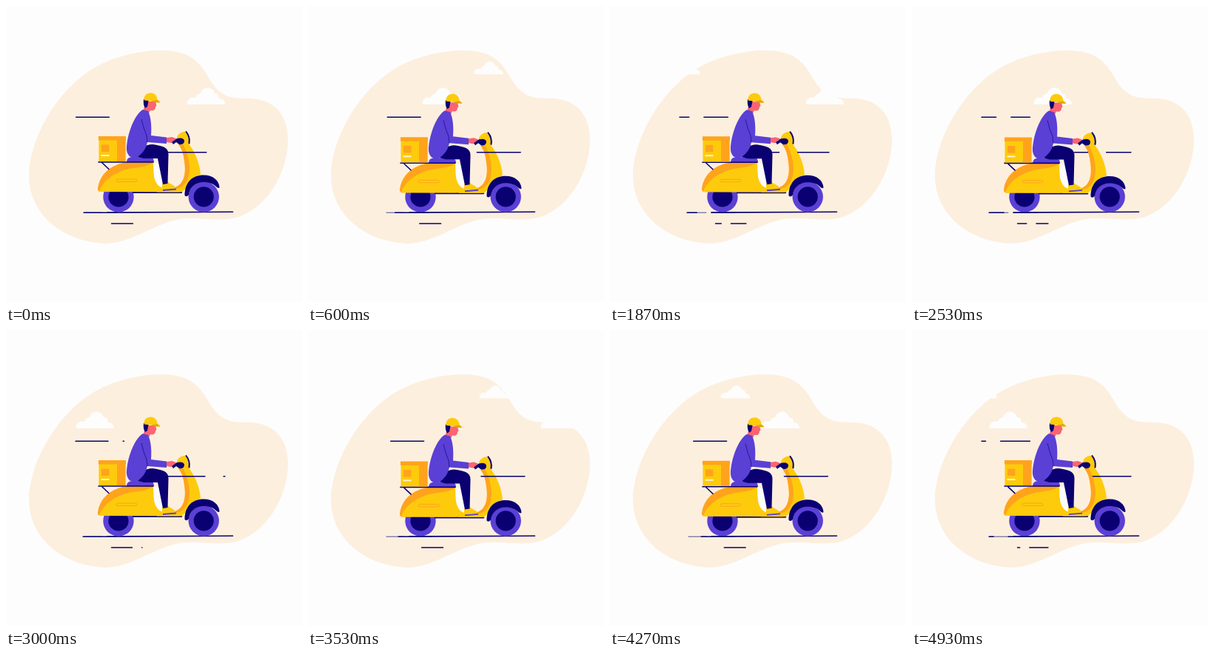
An HTML page that plays this animation: 400 by 400 pixels, repeating every 4.99 s.

```html
<!DOCTYPE html>
<html lang="en">
<head>
<meta charset="utf-8">
<title>Scooter delivery</title>
<style>
  html, body { margin: 0; width: 100%; height: 100%; overflow: hidden; background: #fdfdfd; }
  svg { display: block; width: 100%; height: 100%; }
  .navy { fill: #0a0072; }
  .purple { fill: #5a40d4; }
  .yellow { fill: #fdcb0c; }
  .orange { fill: #ffa31c; }
  .skin { fill: #fb6470; }
  .line { fill: none; stroke: #0a0072; stroke-width: 1.6; stroke-linecap: round; }
</style>
</head>
<body>
<svg viewBox="0 0 400 400">
  <defs>
    <path id="cloud" fill="#fdfdfd" d="M-25 23C-27 15-18 12-14 14C-12 9-9 8-7 8C-4-2 9-2 12 8C16 8 18 11 18 15C23 15 26 18 26 23Z"/>
    <g id="wheel"><circle r="20.7" class="purple"/><circle r="13.6" class="navy"/></g>
  </defs>

  <path fill="#fdefde" d="M31 225C35 167 78 105 124 81C163 60 225 52 251 70C275 86 274 112 300 122C314 127 330 122 348 128C372 136 382 158 381 185C379 225 355 270 315 285C285 294 257 282 226 290C193 299 167 321 133 321C75 318 29 280 31 225Z"/>

  <g id="small"><use href="#cloud"/><use href="#cloud" x="436.4"/></g>
  <g id="big"><use href="#cloud"/><use href="#cloud" x="300"/></g>

  <path class="line" style="stroke-width:.7" d="M106 279.2H130"/>
  <path class="line" d="M137 279.1L306.5 278.2"/>
  <use href="#wheel" x="152" y="258"/>
  <use href="#wheel" x="267.2" y="257.8"/>

  <g id="ride">
    <!-- scooter body -->
    <path class="line" style="stroke-width:2.4" d="M172 251.8H237"/>
    <path fill="#fdfdfd" d="M198 212H208L213 247C202 246 198 231 198 212Z"/>
    <path class="orange" d="M124 247C126 227 143 213 165 211L199 211L200 251H128Q124 251 124 247Z"/>
    <path class="yellow" d="M126 251C131 235 150 222 172 219C188 217 195 215 199 211C198 231 202 245 214 246L241 246L238 251.5Z"/>
    <rect x="149" y="234" width="28" height="3.5" rx="1.7" fill="none" stroke="#ffa31c"/>
    <path class="yellow" d="M233 187L246 185C256 198 262 213 263 228C252 230 246 238 243 246Q240 252 230 251.5H204L202 246H224C240 244 244 228 241 210C240 199 237 192 233 187Z"/>
    <path class="orange" d="M233 187L239 186C246 200 250 216 247 229C244 242 236 248 222 248L214 246H224C240 244 244 228 241 210C240 199 237 192 233 187Z"/>
    <path class="navy" d="M241.5 256C241.5 238 252 228.5 267 228.5C280 228.5 288 236 288.5 245Q288 247 285 245C280 240 275 238 267 238C255 238 248 246 247 255Q244 259 241.5 256Z"/>

    <!-- seat and delivery box -->
    <path class="purple" d="M163 211Q163 204 171 204H195Q200 205 200 211Z"/>
    <path class="line" d="M125 211H199M130 212L139 220.5"/>
    <path class="yellow" d="M125.5 178H161.5V210H125.5Z"/>
    <path class="orange" d="M125 176H162V181.5H125ZM150 181H161.5V210H150ZM129 187.5H139.5V197H129Z"/>
    <path fill="#fff3d0" d="M128.5 201H139.5V203H128.5Z"/>

    <!-- headlight and handlebar -->
    <path class="yellow" d="M231 178C232 172 239 169 244 170Q248 177 247 185.5L236 188Q230 184 231 178Z"/>
    <path class="line" style="stroke-width:2" d="M243.5 170Q249 177 247.5 185.5"/>

    <!-- rider -->
    <path class="yellow" d="M211 240L218 237C221 241 229 241 229.5 248H211Z"/>
    <path fill="none" stroke="#5a40d4" stroke-width="1.8" d="M212 249L230 247.5"/>
    <path class="navy" d="M172 202C178 194 188 187 198 187C212 189 220 191 219.5 201L218.5 240L212 241L205 206H186Z"/>
    <path class="skin" d="M189 129H202L203.5 135L202 136C202 140 200 142 195 141L193 145L185 143Z"/>
    <path class="navy" d="M186 126H193L191 136L188 138Q185 133 186 126Z"/>
    <path class="yellow" d="M187 128C185 121 191 117 196 117.5C202 118 204 122 204.5 126.5Q208 128 208.5 130.5L202 129L187 127.5Z"/>
    <path fill="#e0a808" d="M196 128.5L204 127L208.5 130.5L202 130.5Z"/>
    <path class="purple" d="M185 140C173 147 163 175 163 194C164 204 171 207 178 204C184 199 189 194 191 184L217 186V177.5L196 175C197 163 196 150 192 142Z"/>
    <path fill="none" stroke="#2a16a0" d="M183 153Q186 166 190 175L191 184"/>
    <path class="skin" d="M217 178L224 177L230 179L229 183L223 185L217 184Z"/>
    <path class="navy" d="M224 184L231 179Q240 177 241 182Q241 188 234 187L230 184L226 187Z"/>
  </g>

  <g id="dashes"></g>
</svg>
<script>
  const $ = id => document.getElementById(id);
  const LOOP = 4990, STEP = 1000 / 15, DASH_CYCLE = 746;
  const mod = (a, n) => (a % n + n) % n;

  // Each row: window left, window right, y, dash, gap, start of a dash at time zero
  const streaks = [
    [93.5, 160, 150.3, 46, 19, 94],
    [219, 296.5, 197.8, 60, 24, 211.3],
    [142, 184.5, 294, 30, 12, 142],
    [103.5, 169, 279.2, 46, 19, 104.5]
  ].map(([left, right, y, dash, gap, start]) => {
    const path = document.createElementNS("http://www.w3.org/2000/svg", "path");
    path.setAttribute("class", "line");
    $("dashes").append(path);
    return t => {
      const period = dash + gap;
      let d = "";
      for (let x = left - period + mod(start - left - period * t / DASH_CYCLE, period); x < right; x += period) {
        const a = Math.max(x, left) + .6, b = Math.min(x + dash, right) - .6;
        if (b > a) d += `M${a} ${y}H${b}`;
      }
      path.setAttribute("d", d);
    };
  });

  function draw(now) {
    // Fifteen steps a second, each starting on the nearest hundredth
    const tick = Math.floor(now % LOOP / 10) * 10;
    const t = Math.floor((tick + 5) / STEP) * STEP;
    const bigX = mod(330 - .15 * t, 300) - 60;
    const smallX = mod(371 - .112 * t, 336) - 60;
    $("big").setAttribute("transform", `translate(${bigX} 110)`);
    $("small").setAttribute("transform", `translate(${smallX} 74.5) scale(.77)`);
    const bob = .7 * (1 - Math.cos(t * Math.PI / 500));
    $("ride").setAttribute("transform", `translate(0 ${bob})`);
    streaks.forEach(move => move(t));
  }

  const begin = performance.now();
  function loop() {
    draw(performance.now() - begin);
    requestAnimationFrame(loop);
  }
  loop();
</script>
</body>
</html>
```
